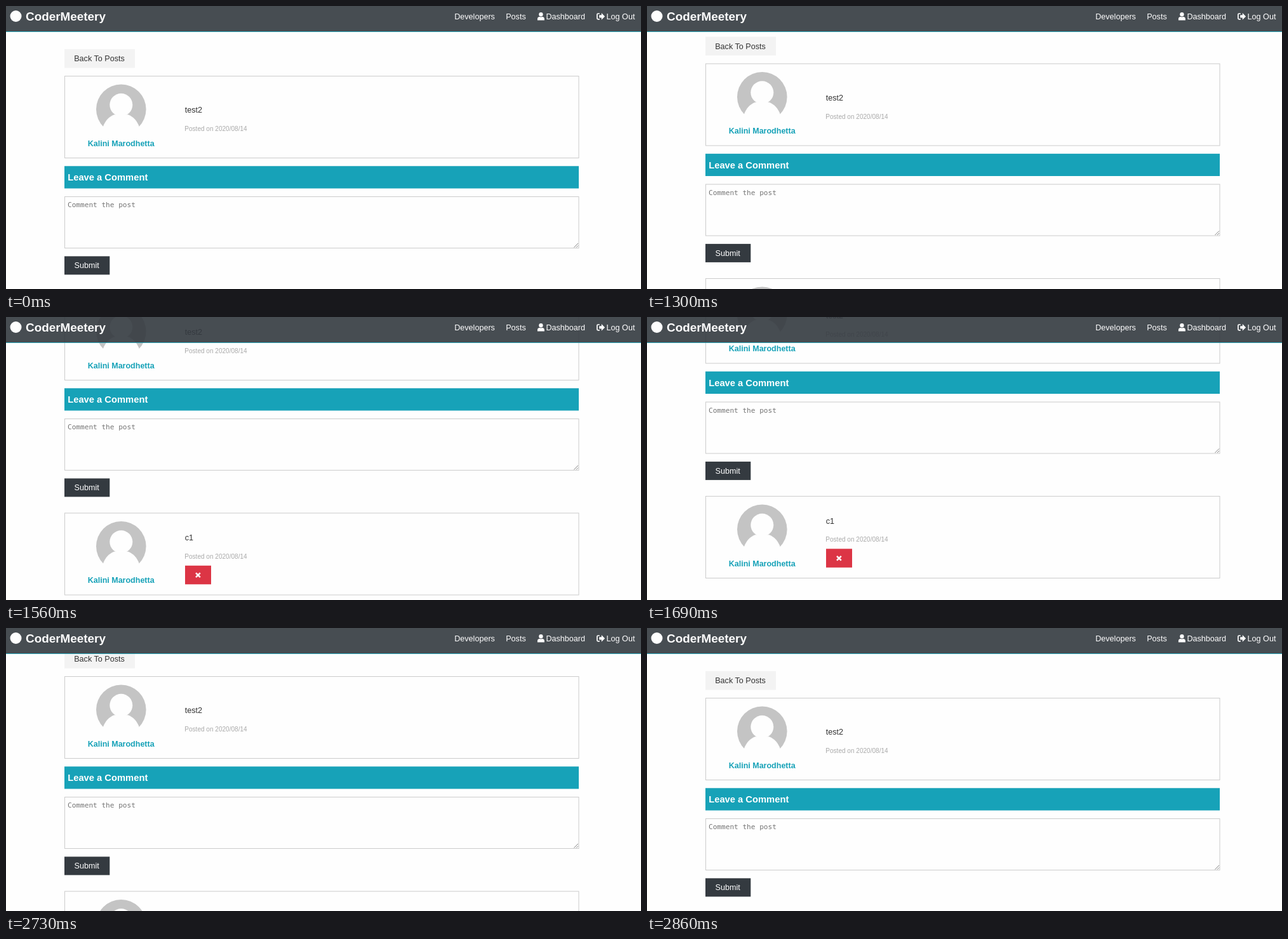
Animation, 1000 px wide and 446 px high, one loop 5.33 s. Source, as an HTML page:

```html
<!DOCTYPE html>
<html lang="en">
<head>
<meta charset="utf-8">
<title>Post comments</title>
<style>
  html, body { margin: 0; width: 100%; height: 100%; overflow: hidden; background: #fefefe; }
  svg { display: block; width: 1000px; height: 446px; }
  text { font: 12.6px "Liberation Sans", Arial, sans-serif; fill: #333; white-space: pre; }
  .name { font-size: 12.5px; font-weight: bold; fill: #17a2b8; text-anchor: middle; }
  .date { font-size: 10.05px; fill: #aaa; }
  .head { font-size: 14.74px; font-weight: bold; }
  .hint { font: 11.1px "DejaVu Sans Mono", monospace; fill: #757575; }
  .logo { font-size: 18.9px; font-weight: bold; }
  .white, .nav text { fill: #fff; }
  .box { fill: none; stroke: #ccc; }
  .nav { opacity: .9; }
</style>
</head>
<body>
<svg viewBox="0 0 1000 446">
  <defs>
    <clipPath id="round"><circle r="39.3"/></clipPath>
    <g id="avatar">
      <circle r="39.3" fill="#c4c4c4"/>
      <g fill="#fefefe">
        <circle cy="-7" r="18"/>
        <path d="M-28.5 27.5C-25 18 -19 11.5 -11 8.5H11C19 11.5 25 18 28.5 27.5V41H-28.5Z"/>
      </g>
    </g>
    <g id="card">
      <rect class="box" x="92.5" y=".5" width="809.5" height="129"/>
      <use href="#avatar" x="181.3" y="52.8"/>
      <text class="name" x="181.2" y="110.8">Kalini Marodhetta</text>
    </g>
  </defs>

  <g id="page">
    <rect x="92" y="68" width="111" height="29.5" fill="#f3f3f3"/>
    <text x="107.2" y="87">Back To Posts</text>

    <g transform="translate(0 110)">
      <use href="#card"/>
      <text x="281.7" y="58">test2</text>
      <text class="date" x="281.3" y="87">Posted on 2020/08/14</text>
    </g>

    <rect x="92" y="252.3" width="810" height="35.2" fill="#17a2b8"/>
    <text class="head white" x="97.2" y="275">Leave a Comment</text>

    <rect class="box" x="92.5" y="300.5" width="809.5" height="81"/>
    <path d="M894.5 380.5l6.5-6.5M898 380.5l3-3" stroke="#777" stroke-width=".9"/>
    <text class="hint" x="97" y="317">Comment the post</text>

    <rect x="92" y="394.4" width="71.3" height="29" fill="#343a40"/>
    <text class="white" x="107.5" y="413">Submit</text>

    <g transform="translate(0 448.5)">
      <use href="#card"/>
      <text x="281.7" y="43.5">c1</text>
      <text class="date" x="281.3" y="72.3">Posted on 2020/08/14</text>
      <rect x="282" y="83.3" width="41" height="29.5" fill="#dc3545"/>
      <path d="M299 94.8l6.8 6.8m0-6.8l-6.8 6.8" stroke="#fff" stroke-width="2.5"/>
    </g>
  </g>

  <g class="nav">
    <rect width="1000" height="40" fill="#343a40"/>
    <rect y="40" width="1000" height="1" fill="#17a2b8"/>
    <circle cx="15.5" cy="16" r="9" fill="#fff"/>
    <text class="logo" x="31" y="22.8">CoderMeetery</text>
    <text x="706.2" y="21">Developers</text>
    <text x="787.2" y="21">Posts</text>
    <text x="850.4" y="21">Dashboard</text>
    <text x="945.6" y="21">Log Out</text>
    <g fill="#fff">
      <circle cx="842.4" cy="13.2" r="3.2"/>
      <path d="M836.9 22.4v-1.6q0-3.6 3.5-3.7q2 .9 4 0q3.5.1 3.5 3.7v1.6z"/>
      <path d="M934.2 14.2h3.6v-3.1l5.3 5.3l-5.3 5.3v-3.1h-3.6z"/>
    </g>
    <path d="M934.8 12h-2.4q-1.5 0-1.5 1.5v5.8q0 1.5 1.5 1.5h2.4" fill="none" stroke="#fff" stroke-width="1.7"/>
  </g>
</svg>
<script>
  const LOOP = 5330;
  // [time in ms, scroll position]: held until the next entry
  const scrolls = [
    [0, 0], [1300, 19.5], [1430, 80], [1560, 140], [1690, 166.5],
    [2600, 111], [2730, 34], [2860, 0]
  ];
  const page = document.getElementById("page");
  const start = performance.now();

  function draw(now) {
    const t = Math.max(0, now - start) % LOOP;
    const [, top] = scrolls.findLast(([at]) => at <= t);
    page.setAttribute("transform", `translate(0 ${-top})`);
    requestAnimationFrame(draw);
  }
  draw(start);
</script>
</body>
</html>
```
